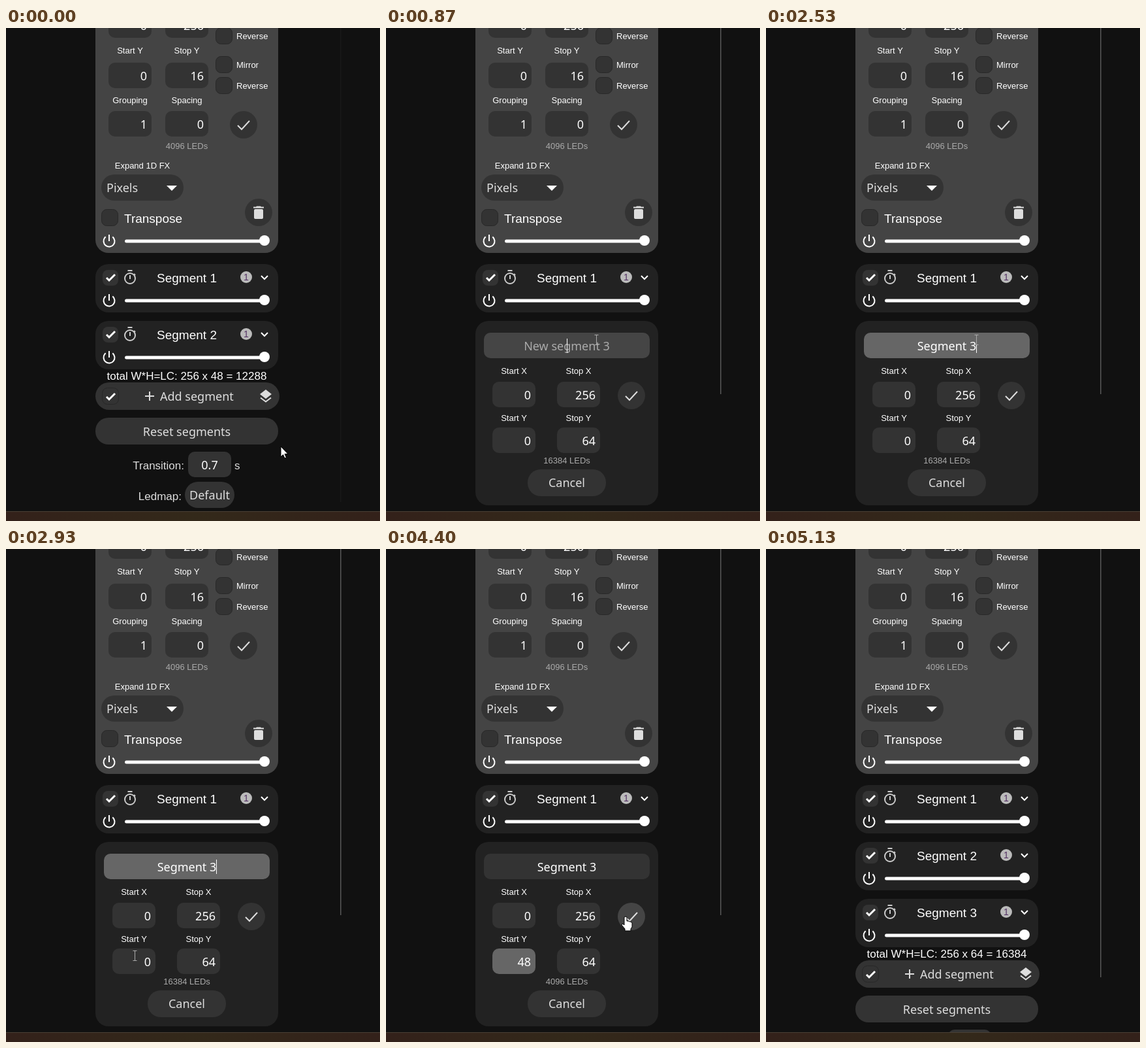
An HTML page with a canvas that plays this animation: 573 px wide and 754 px high, repeating every 5.87 s.

```html
<!DOCTYPE html>
<html lang="en">
<head>
<meta charset="utf-8">
<title>Adding a segment</title>
<style>
  html, body { margin: 0; width: 100%; height: 100%; overflow: hidden; background: #111; }
  canvas { display: block; }
</style>
</head>
<body>
<canvas id="stage" width="573" height="754"></canvas>
<script>
const ctx = document.getElementById('stage').getContext('2d');
const LOOP = 5870;
const LABEL = '"Liberation Sans", Arial, sans-serif';
const CONTROL = '"Noto Sans", "Open Sans", sans-serif';

const gray = v => `rgb(${v},${v},${v})`;
const fade = (t, start) => Math.min(1, Math.max(0, (t - start) / 200));

function box(x, y, w, h, r, fill = '#333', border) {
  ctx.beginPath();
  ctx.roundRect(x, y, w, h, r);
  ctx.fillStyle = fill;
  ctx.fill();
  if (border) { ctx.strokeStyle = border; ctx.lineWidth = 1; ctx.stroke(); }
}

function disc(x, y, r, fill = '#333') {
  ctx.beginPath();
  ctx.arc(x, y, r, 0, 7);
  ctx.fillStyle = fill;
  ctx.fill();
}

function trace(points, x, y) {
  ctx.beginPath();
  for (let i = 0; i < points.length; i += 2) ctx.lineTo(x + points[i], y + points[i + 1]);
}

function line(points, x, y, width = 2, color = '#fff') {
  trace(points, x, y);
  ctx.lineWidth = width;
  ctx.strokeStyle = color;
  ctx.stroke();
}

function shape(points, x, y, fill = '#fff', border) {
  trace(points, x, y);
  ctx.closePath();
  ctx.fillStyle = fill;
  ctx.fill();
  if (border) { ctx.strokeStyle = border; ctx.lineWidth = 1; ctx.stroke(); }
}

function text(str, x, y, size, { color = '#fff', align = 'center', font = LABEL } = {}) {
  ctx.font = `${size}px ${font}`;
  ctx.fillStyle = color;
  ctx.textAlign = align;
  ctx.fillText(str, x, y);
}

const label = (str, x, y, color) => text(str, x, y, 13, { color });
const control = (str, x, y, align = 'center', color = '#ddd') =>
  text(str, x, y, 18, { color, align, font: CONTROL });

function field(value, x, y, fill) {
  box(x, y, 66, 39, 10, fill);
  control(value, x + 59, y + 27, 'right', '#fff');
}

function checkbox(x, y) {
  box(x + .5, y + .5, 25, 25, 8, '#333', '#282828');
}

function tick(x, y) {
  line([-6, 0, -2, 4, 7, -5], x, y, 3);
}

function confirmButton(x, y, fill) {
  disc(x, y, 21, fill);
  line([-9, 1, -3, 7, 9, -6], x, y, 2, '#ddd');
}

function slider(y) {
  ctx.beginPath();
  ctx.arc(158, y + 1, 8.5, -.9, Math.PI + .9);
  ctx.lineWidth = 2;
  ctx.strokeStyle = '#fff';
  ctx.stroke();
  line([0, -9, 0, 1], 158, y);
  box(182, y - 1.5, 214, 5, 2.5, '#fff');
  disc(396, y, 8, '#fff');
}

function segmentCard(n, y) {
  box(137, y, 280, 74, 20, '#222');
  box(148, y + 9, 24, 24, 8);
  tick(160, y + 21);
  ctx.beginPath();
  ctx.arc(190, y + 22, 8, 0, 7);
  ctx.lineWidth = 2;
  ctx.strokeStyle = '#ccc';
  ctx.stroke();
  line([-3, 0, 4, 0], 189.5, y + 10, 2, '#ccc');
  line([0, -5, 0, 1], 190, y + 22, 2, '#ccc');
  line([6, -7, 8, -5], 190, y + 22, 2, '#ccc');
  text('Segment ' + n, 277, y + 28, 19);
  disc(368, y + 20, 9, '#bbb');
  text('1', 368, y + 25, 14, { color: '#536' });
  line([-5, -2.5, 0, 2.5, 5, -2.5], 396, y + 20.5);
  slider(y + 55);
}

function openSegment() {
  box(137, -40, 280, 384, 20, '#444');
  field('0', 157, -24);
  field('256', 244, -24);
  label('Start Y', 190, 39);
  label('Stop Y', 277, 39);
  field('0', 157, 53);
  field('16', 244, 53);
  label('Grouping', 190, 115);
  label('Spacing', 277, 115);
  field('1', 157, 127);
  field('0', 244, 127);
  label('4096 LEDs', 277, 185, '#aaa');
  [['Reverse', -1], ['Mirror', 43], ['Reverse', 75]].forEach(([name, y]) => {
    checkbox(321, y);
    text(name, 353, y + 18, 13, { align: 'left' });
  });
  confirmButton(364, 148);
  label('Expand 1D FX', 209, 215);
  box(146, 224, 126, 40, 20);
  control('Pixels', 154, 251, 'left');
  shape([-8, -4, 8, -4, 0, 4], 254, 245);
  checkbox(146, 277);
  text('Transpose', 181, 298, 19, { align: 'left' });
  disc(387, 282, 21);
  box(380, 277, 14, 15, 2, '#ddd');
  shape([-8, 3, -8, 1, -4, 1, -3, 0, 3, 0, 4, 1, 8, 1, 8, 3], 387, 272.5, '#ddd');
  slider(325);
}

function listEnd(y, total) {
  text(total, 277, y + 16, 17);
  box(137, y + 20, 282, 42, 21);
  checkbox(147, y + 28);
  tick(160, y + 42);
  line([-7, 0, 7, 0], 220, y + 41, 2, '#ddd');
  line([0, -7, 0, 7], 220, y + 41, 2, '#ddd');
  control('Add segment', 236, y + 48, 'left');
  shape([-9, 0, 0, -7, 9, 0, 0, 7], 398, y + 38, '#ddd');
  line([-8, 0, 0, 6, 8, 0], 398, y + 43.5, 2, '#ddd');
  box(137, y + 74, 280, 41, 20);
  control('Reset segments', 277, y + 102);
  text('Transition:', 273, y + 153, 17, { color: '#ddd', align: 'right' });
  box(279, y + 126, 66, 39, 10);
  control('0.7', 312, y + 153, 'center', '#fff');
  text('s', 350, y + 153, 17, { color: '#ddd', align: 'left' });
  text('Ledmap:', 269, y + 200, 17, { color: '#ddd', align: 'right' });
  box(274, y + 172, 76, 40, 20);
  control('Default', 312, y + 199);
}

const TITLE = 'Segment 3';
const KEY_TIMES = [1000, 1270, 1330, 1600, 1670, 1800, 1870, 1930, 2070];
const FOCUS_TITLE = 800, FOCUS_START = 2940, HOVER_CONFIRM = 4330;

function newSegmentForm(t) {
  const typed = TITLE.slice(0, KEY_TIMES.filter(k => t >= k).length);
  const startFocus = fade(t, FOCUS_START);
  box(137, 448, 280, 282, 20, '#222');
  box(150, 466, 254, 39, 10, gray(51 + 51 * (fade(t, FOCUS_TITLE) - startFocus)));
  control(typed || 'New segment 3', 277, 493, 'center', typed ? '#fff' : '#aaa');
  if (t >= FOCUS_TITLE && t < FOCUS_START) {
    const caret = 277.5 + ctx.measureText(typed).width / 2;
    line([0, 0, 0, 22], Math.floor(caret) + .5, 475, 1);
  }

  label('Start X', 196, 529);
  label('Stop X', 295, 529);
  field('0', 163, 541);
  field('256', 262, 541);
  confirmButton(376, 562, gray(51 + 51 * fade(t, HOVER_CONFIRM)));

  const startY = t < 3400 ? 0 : t < 3870 ? 4 : 48;
  label('Start Y', 196, 601);
  label('Stop Y', 295, 601);
  field('', 163, 611, gray(51 + 51 * startFocus));
  if (t >= 3070 && t < 3400) box(211, 619, 10, 23, 0, '#bbb');
  control(startY, 222, 638, 'right', '#fff');
  field('64', 262, 611);
  label(256 * (64 - startY) + ' LEDs', 277, 666, '#aaa');
  box(217, 675, 120, 41, 20);
  control('Cancel', 277, 702);
}

const pointers = {
  arrow(x, y) {
    shape([0, 0, 0, 16, 3.5, 12.5, 6, 18, 8.5, 17, 6, 11.5, 11, 11.5], x, y, '#fff', '#000');
  },
  beam(x, y) {
    x = Math.round(x) + .5;
    line([-3, -7.5, 3, -7.5], x, y, 1, '#aaa');
    line([0, -7, 0, 7], x, y, 1, '#aaa');
    line([-3, 7.5, 3, 7.5], x, y, 1, '#aaa');
  },
  hand(x, y) {
    shape([-1, 1, 1, 0, 3, 1, 3, 7, 6, 7, 7, 8, 9, 8, 11, 10, 11, 16, 9, 19, 9, 22,
      0, 22, 0, 19, -5, 13, -4, 11, -1, 13], x, y, '#fff', '#000');
  }
};

// time, x, y, pointer (none while typing)
const PATH = [
  [0, 421, 640, 'arrow'], [270, 350, 572, 'hand'], [470, 340, 566, 'beam'],
  [600, 322, 490, 'beam'], [670, 322, 477, 'beam'], [1000, 322, 477],
  [2530, 322, 477, 'beam'], [2870, 197, 622, 'beam'], [2930, 197, 622, 'beam'],
  [3070, 288, 626, 'beam'], [3270, 288, 626, 'beam'], [3330, 291, 627, 'beam'],
  [3400, 300, 621], [3600, 300, 620, 'beam'], [3670, 300, 621, 'beam'],
  [4070, 300, 621, 'beam'], [4330, 366, 562, 'hand'], [4530, 366, 562, 'arrow'],
  [4670, 290, 628, 'hand'], [4800, 195, 672, 'arrow'], [5000, 79, 738, 'arrow'],
  [5070, 50, 746, 'arrow'], [5130, 46, 754], [LOOP, 46, 754]
];

function pointer(t) {
  const i = PATH.findIndex(key => key[0] > t);
  const [t0, x0, y0, kind] = PATH[i - 1];
  const [t1, x1, y1] = PATH[i];
  const p = (t - t0) / (t1 - t0);
  if (kind) pointers[kind](x0 + (x1 - x0) * p, y0 + (y1 - y0) * p);
}

function bottomBar() {
  const glow = ctx.createLinearGradient(0, 0, 573, 0);
  glow.addColorStop(0, '#33211a');
  glow.addColorStop(.5, '#33291a');
  glow.addColorStop(1, '#33211a');
  box(0, 739, 573, 15, 0, glow);
  box(0, 739, 573, 1, 0, '#4a4035');
}

function draw(t) {
  const opened = t >= 470, saved = t >= 4530;
  box(0, 0, 573, 754, 0, '#111');
  box(512, 0, 1.6, saved ? 655 : opened ? 560 : 725, 0, opened ? '#555' : '#191919');
  openSegment();
  segmentCard(1, 361);
  if (opened && !saved) {
    newSegmentForm(t);
  } else {
    segmentCard(2, 448);
    if (saved) segmentCard(3, 535);
    listEnd(saved ? 609 : 522, 'total W*H=LC: 256 x ' + (saved ? '64 = 16384' : '48 = 12288'));
  }
  bottomBar();
  pointer(t);
}

function animate() {
  const step = Math.floor(performance.now() % LOOP * .015 + .1);
  draw(Math.min(Math.round(step * 20 / 3) * 10, LOOP - 1));
  requestAnimationFrame(animate);
}
animate();
</script>
</body>
</html>
```
